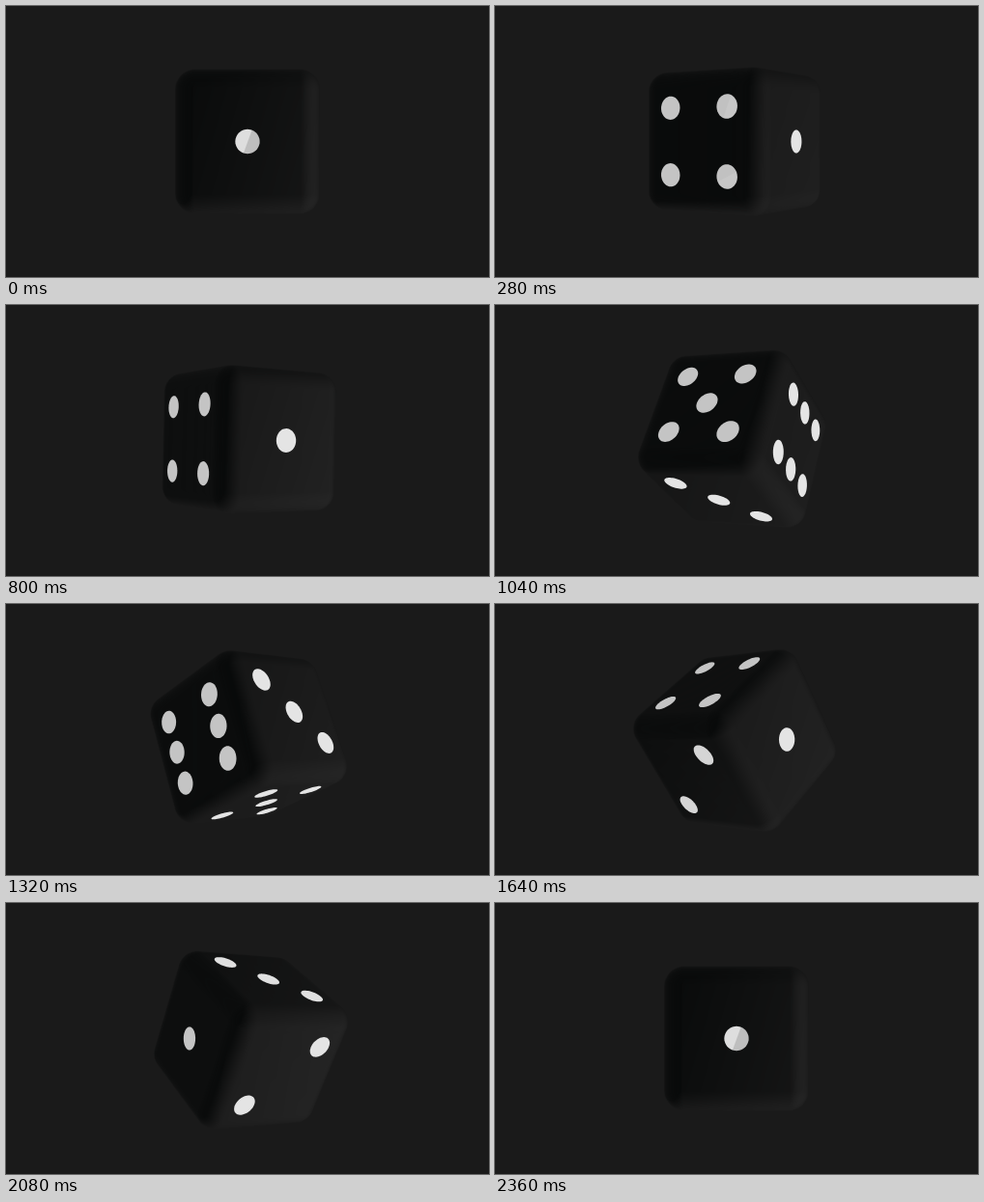
Write an HTML page with a canvas that moves like this. It is 500x281 px and loops after 2400 ms.

```html
<!DOCTYPE html>
<html lang="en">
<head>
<meta charset="utf-8">
<title>Rolling die</title>
<style>
  html, body { margin: 0; width: 100%; height: 100%; overflow: hidden; background: #1a1a1a; }
  canvas { display: block; width: 500px; height: 281px; }
</style>
</head>
<body>
<canvas id="stage" width="500" height="281"></canvas>
<script>
const ctx = document.getElementById('stage').getContext('2d');
const W = 500, H = 281, CX = 250, CY = 140.5;
const LOOP = 2400, STEP = 40;
const FOCAL = 750, CAM = 10.8;           // lengths in half cube sides
const ROUND = 0.28, FLAT = 1 - ROUND;
const P = 0.472, PIP = 0.165;
const BG = 26;
const BOX = { x: 135, y: 36, w: 230, h: 209 };

const clamp = (v, lo = 0, hi = 1) => Math.min(hi, Math.max(lo, v));
const smooth = u => { u = clamp(u); return u * u * (3 - 2 * u); };
const gray = v => { v = Math.round(v); return `rgb(${v},${v},${v})`; };

// Each face: normal, two tangents, pip places along the tangents
const corners = [[-1, -1], [-1, 1], [1, -1], [1, 1]];
const faces = [
  { n: [0, 0, 1], a: [1, 0, 0], b: [0, 1, 0], pips: [[0, 0]], one: true },
  { n: [0, 0, -1], a: [1, 0, 0], b: [0, 1, 0], pips: [...corners, [-1, 0], [1, 0]] },
  { n: [-1, 0, 0], a: [0, 1, 0], b: [0, 0, 1], pips: corners },
  { n: [1, 0, 0], a: [0, 1, 0], b: [0, 0, 1], pips: [[-1, -1], [0, 0], [1, 1]] },
  { n: [0, -1, 0], a: [1, 0, 0], b: [0, 0, 1], pips: [[1, -1], [-1, 1]] },
  { n: [0, 1, 0], a: [1, 0, 0], b: [0, 0, 1], pips: [...corners, [0, 0]] }
];

// World directions of the die's own axes: four turns of yaw, two of roll
function axesAt(t) {
  const u = clamp(t / 2360);
  const eased = smooth(u + u * (1 - u) * (0.0235 * (1 - u) + 0.008 * u));
  const yaw = eased * 8 * Math.PI;
  const roll = smooth((t - 760) / 1600) * 4 * Math.PI;
  const cy = Math.cos(yaw), sy = Math.sin(yaw);
  const cr = Math.cos(roll), sr = Math.sin(roll);
  return [[cr * cy, -sr, -cr * sy], [sr * cy, cr, -sr * sy], [sy, 0, cy]];
}

const toWorld = (m, v) => [0, 1, 2].map(i => m[0][i] * v[0] + m[1][i] * v[1] + m[2][i] * v[2]);

function project(p) {
  const s = FOCAL / (CAM - p[2]);
  return [CX + p[0] * s, CY - p[1] * s];
}

// Light from the lower right; grazing angles fade into the backdrop
function bodyTone(nx, ny, nz, x, y) {
  const lift = ny < 0 ? -14 * ny : -6 * ny;
  const lit = Math.max(8, 15 + 26 * nx * nz + lift + 0.07 * (x - CX) + 0.02 * (y - CY));
  return lit + (BG - lit) * 0.85 * Math.pow(1 - clamp(nz), 1.5);
}

const img = ctx.createImageData(BOX.w, BOX.h);

// Ray-marched rounded box
function drawBody(m) {
  const [X, Y, Z] = m, data = img.data;
  const ox = X[2] * CAM, oy = Y[2] * CAM, oz = Z[2] * CAM;
  for (let j = 0, o = 0; j < BOX.h; j++) {
    for (let i = 0; i < BOX.w; i++, o += 4) {
      const sx = BOX.x + i + 0.5, sy = BOX.y + j + 0.5;
      const rx = (sx - CX) / FOCAL, ry = (CY - sy) / FOCAL;
      const dx = X[0] * rx + X[1] * ry - X[2];
      const dy = Y[0] * rx + Y[1] * ry - Y[2];
      const dz = Z[0] * rx + Z[1] * ry - Z[2];
      let k = 9.2, near = 9, qx = 0, qy = 0, qz = 0, nx = 0, ny = 0, nz = 0;
      for (let n = 0; n < 32 && k < 12.3; n++) {
        const px = ox + dx * k, py = oy + dy * k, pz = oz + dz * k;
        qx = Math.max(Math.abs(px) - FLAT, 0);
        qy = Math.max(Math.abs(py) - FLAT, 0);
        qz = Math.max(Math.abs(pz) - FLAT, 0);
        const len = Math.sqrt(qx * qx + qy * qy + qz * qz), d = len - ROUND;
        if (d < near) {
          near = d;
          nx = Math.sign(px) * qx / len;
          ny = Math.sign(py) * qy / len;
          nz = Math.sign(pz) * qz / len;
        }
        if (d < 0.001) break;
        k += d;
      }
      const cover = clamp(1 - near * 70);
      let tone = BG;
      if (cover > 0) {
        const wx = X[0] * nx + Y[0] * ny + Z[0] * nz;
        const wy = X[1] * nx + Y[1] * ny + Z[1] * nz;
        const wz = X[2] * nx + Y[2] * ny + Z[2] * nz;
        tone += (bodyTone(wx, wy, wz, sx, sy) - BG) * cover;
      }
      data[o] = tone;
      data[o + 1] = data[o + 2] = tone + Math.max(0, BG - tone) * 0.08;
      data[o + 3] = 255;
    }
  }
  ctx.putImageData(img, BOX.x, BOX.y);
}

// Flat tone, or two tones with a hard slanted edge when it faces the viewer
function pipFill(face, n, x, y) {
  const base = clamp(206 + 60 * n[0] + 70 * Math.max(0, -n[1]), 196, 228);
  const split = clamp(1.5 - Math.abs(x - CX) / 12) * smooth((n[2] - 0.8) / 0.12);
  if (split === 0) return gray(base);
  const tilt = (face.one ? 70 : 50 - 0.6 * (y - CY)) * Math.PI / 180;
  const gx = Math.sin(tilt) * 13, gy = Math.cos(tilt) * 13;
  const g = ctx.createLinearGradient(x - gx, y - gy, x + gx, y + gy);
  const diff = (face.one ? 16 : -12) * split;
  g.addColorStop(0, gray(base + diff));
  g.addColorStop(0.49, gray(base + diff));
  g.addColorStop(0.53, gray(base - diff));
  g.addColorStop(1, gray(base - diff));
  return g;
}

function drawPips(m) {
  for (const face of faces) {
    const n = toWorld(m, face.n), a = toWorld(m, face.a), b = toWorld(m, face.b);
    const at = (u, v) => project(n.map((c, i) => c + a[i] * u + b[i] * v));
    if (n[2] * CAM <= 1) continue;
    for (const [pu, pv] of face.pips) {
      const [x, y] = at(pu * P, pv * P);
      ctx.beginPath();
      for (let i = 0; i < 48; i++) {
        const w = i * Math.PI / 24;
        ctx.lineTo(...at(pu * P + PIP * Math.cos(w), pv * P + PIP * Math.sin(w)));
      }
      ctx.closePath();
      ctx.fillStyle = pipFill(face, n, x, y);
      ctx.fill();
    }
  }
}

function draw(t) {
  const m = axesAt(t);
  ctx.fillStyle = gray(BG);
  ctx.fillRect(0, 0, W, H);
  drawBody(m);
  drawPips(m);
}

const start = performance.now();
let shown = -1;
function tick() {
  const t = Math.floor((performance.now() - start) % LOOP / STEP) * STEP;
  if (t !== shown) draw(shown = t);
  requestAnimationFrame(tick);
}
tick();
</script>
</body>
</html>
```
